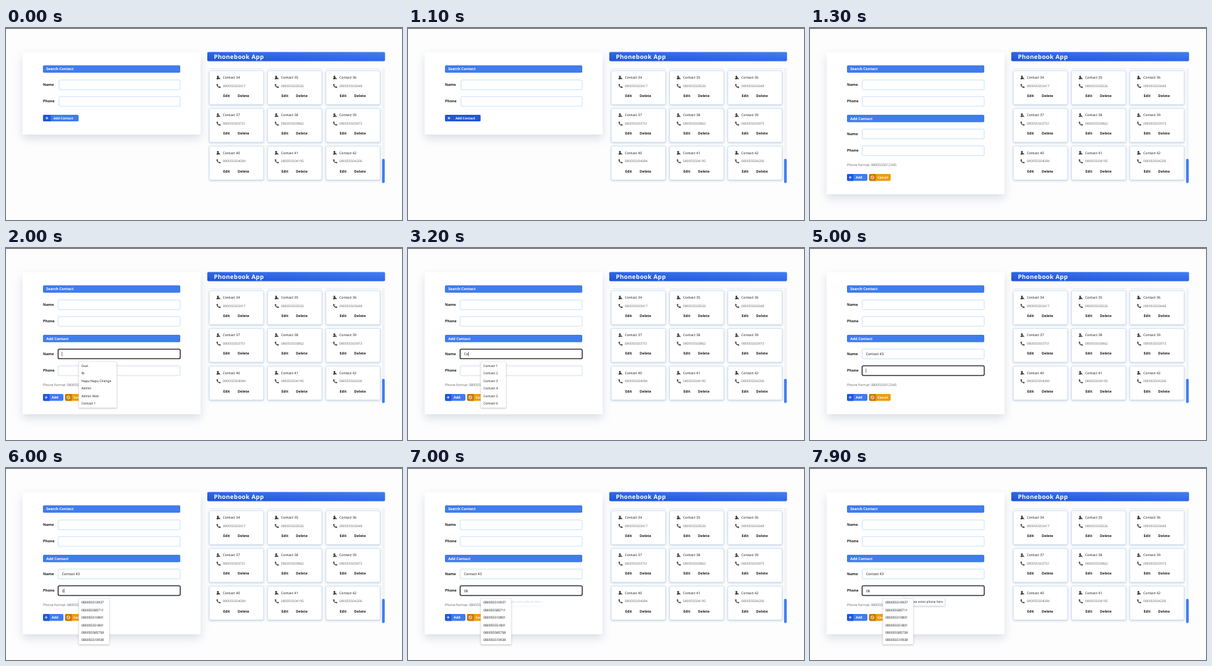
An HTML page that plays this animation: 600x292 px, repeating every 8000 ms.

```html
<!DOCTYPE html>
<html lang="en">
<head>
<meta charset="utf-8">
<title>Phonebook App</title>
<style>
  html, body { margin: 0; width: 100%; height: 100%; overflow: hidden; background: #fdfdfe; }
  svg { display: block; width: 600px; height: 292px; }
  text { font-family: "Noto Sans", "Open Sans", sans-serif; font-size: 5.2px; fill: #1c1c1c;
         white-space: pre; text-rendering: geometricPrecision; }
  .b { font-weight: 700; }
  .w { fill: #fff; }
  .g { fill: #6b6b6b; }
  .panel { fill: #fff; filter: drop-shadow(0 6px 7px rgba(70, 95, 125, .2)); }
  .card { fill: #fff; stroke: #bcdaf7; stroke-width: .7; filter: drop-shadow(0 1.5px 1.5px rgba(70, 95, 130, .28)); }
  .field { fill: #fff; stroke: #b9d8f8; stroke-width: .8; }
  .ring { fill: none; stroke: #1d1d20; stroke-width: 1.3; }
  .pop { fill: #fff; stroke: #dedede; stroke-width: .5; filter: drop-shadow(0 1px 1.2px rgba(0, 0, 0, .22)); }
</style>
</head>
<body>
<svg id="stage" viewBox="0 0 600 292">
  <defs>
    <linearGradient id="bar" x1="0" y1="1" x2="1" y2="0">
      <stop offset="0" stop-color="#1f50d9"/><stop offset="1" stop-color="#427ff1"/>
    </linearGradient>
    <clipPath id="view"><rect x="303" y="61" width="266" height="177"/></clipPath>
    <clipPath id="pill"><rect x="56" y="132" width="54" height="10" rx="1.8"/></clipPath>
  </defs>
</svg>
<script>
const LOOP = 8000;
const BLUE = '#3f7cee', DARK = '#2257dc';
const NAME = 'Contact 43', PHONE = '08';
const nameKeys = [2900, 3200, 3300, 3400, 3500, 3600, 3700, 3800, 4200, 4400];
const phoneKeys = [6000, 6100];
const caretStarts = [1600, 2000, ...nameKeys, 4700, 5000, ...phoneKeys];

const contacts = ['080055503417', '080055503526', '080055503648',
                  '080055503751', '080055503862', '080055503973',
                  '080055504084', '080055504195', '080055504206'];
const people = ['Duvi', 'Ib', 'Napu Napu Orange', 'Admin', 'Admin Wah', 'Contact 1'];
const numbered = [1, 2, 3, 4, 5, 6].map(n => 'Contact ' + n);
const fours = [40, 41, 42, 4].map(n => 'Contact ' + n);
const phones = ['080055510937', '080055585711', '080055510801',
                '080055551801', '080055585758', '080055510938'];

const stage = document.getElementById('stage');
const $ = id => document.getElementById(id);
const rect = (x, y, w, h, rx = 0, extra = '') =>
  `<rect x="${x}" y="${y}" width="${w}" height="${h}" rx="${rx}" ${extra}/>`;
const text = (x, y, s, size, cls = '', extra = '') =>
  `<text x="${x}" y="${y}" class="${cls}" style="font-size:${size}px" ${extra}>${s}</text>`;
const header = (y, s) => rect(56, y, 208, 11.3, 1.8, `fill="${BLUE}"`) + text(61, y + 7.6, s, 5.5, 'b w');
const plus = (x, y) =>
  `<path d="M${x - 2} ${y}h4M${x} ${y - 2}v4" stroke="#fff" stroke-width=".9"/>`;

function row(y, label, id = '') {
  return text(56, y + 9.1, label, 5.55, 'b') +
    rect(79, y, 185, 14.8, 2, `class="field" ${id && `id="${id}"`}`);
}

function card(i) {
  const x = 308 + i % 3 * 88.3, y = 65 + Math.floor(i / 3) * 57.3;
  return `<g transform="translate(${x} ${y})">` +
    rect(0, 0, 82.3, 51.5, 1.8, 'class="card"') +
    '<g fill="#3a3a3a"><circle cx="13" cy="8.9" r="1.4"/>' +
    '<path d="M10.9 13c.2-2.2 1.2-3 2.6-2.9 1.7.1 2.7 1.2 3.4 2.9l-1.7-.3-.7-.9-.4 1.2z"/>' +
    '<path d="M11.3 20.4l1.3-.4.8 1.6-.8.7q.8 1.6 2.3 2.3l.7-.8 1.6.7-.4 1.4q-.2.4-.7.3-4.4-.7-5.2-5.2 0-.4.4-.6z"/></g>' +
    text(20.5, 12, 'Contact ' + (34 + i), 5.15) +
    text(20.5, 24.9, contacts[i], 5.03, 'g') +
    text(21, 40, 'Edit', 5.4, 'b') + text(43, 40, 'Delete', 5.4, 'b') + '</g>';
}

function popup(id, x, y, w, items) {
  return `<g id="${id}">` + rect(x, y, w, items.length * 11.45 + 1.2, .8, 'class="pop"') +
    items.map((s, i) => text(x + 4, y + 7.9 + i * 11.45, s, 4.95)).join('') + '</g>';
}

stage.insertAdjacentHTML('beforeend',
  rect(0, 0, 600, 292, 0, 'fill="#fdfdfe"') +
  rect(0, 0, 600, .9, 0, 'fill="#2b2b2e"') +
  rect(25.3, 37, 269.5, 125, 1, 'class="panel" id="panel"') +
  rect(305, 36.5, 269.3, 14, 1.8, 'fill="url(#bar)"') +
  text(315, 47, 'Phonebook App', 9.1, 'b w', 'letter-spacing=".33"') +
  rect(569.8, 61, 4.2, 175, 2, 'fill="#f1f3f6"') +
  rect(569.8, 199, 4, 36.8, 1.8, `fill="${BLUE}"`) +
  '<g clip-path="url(#view)">' + rect(308, 30, 82.3, 29.6, 1.8, 'class="card"') +
  rect(396.3, 30, 82.3, 29.6, 1.8, 'class="card"') + rect(484.6, 30, 82.3, 29.6, 1.8, 'class="card"') +
  contacts.map((_, i) => card(i)).join('') + '</g>' +
  header(56.8, 'Search Contact') +
  row(79, 'Name', 'findName') + row(104.2, 'Phone', 'findPhone') +

  '<g id="opener"><g clip-path="url(#pill)">' +
  rect(56, 132, 54, 10, 0, `fill="${BLUE}"`) +
  rect(56, 132, 12, 10, 0, `fill="${DARK}" id="sweep"`) + '</g>' +
  plus(62, 137) + text(72, 138.8, 'Add Contact', 4.9, 'b w') + '</g>' +

  '<g id="form">' + header(132, 'Add Contact') +
  row(153.8, 'Name') + row(179.2, 'Phone') +
  rect(79, 153.8, 185, 14.6, 2, 'class="ring" id="nameRing"') +
  rect(79, 179.2, 185, 14.6, 2, 'class="ring" id="phoneRing"') +
  text(84.7, 163.1, '', 5.4, '', 'id="nameText"') +
  text(84.7, 188.6, '', 5.4, '', 'id="phoneText"') +
  rect(84.5, 158, .6, 6.6, 0, 'fill="#222" id="caret"') +
  text(56, 210, 'Phone format: 0800555012345', 5.19, 'g') +
  rect(56, 222, 31, 10.4, 1.8, `fill="${BLUE}"`) +
  `<path d="M65.8 222h-8q-1.8 0-1.8 1.8v6.8q0 1.8 1.8 1.8h8z" fill="${DARK}"/>` +
  plus(60.9, 227.2) + text(69.2, 229, 'Add', 5.1, 'b w') +
  rect(89.5, 222, 32.8, 10.4, 1.8, 'fill="#ee9c10"') +
  '<path d="M99.6 222h-8.3q-1.8 0-1.8 1.8v6.8q0 1.8 1.8 1.8h8.3z" fill="#c87807"/>' +
  '<g fill="none" stroke="#fff" stroke-width=".8"><circle cx="94.6" cy="227.2" r="2.3"/><path d="M93 225.6l3.2 3.2"/></g>' +
  text(102.2, 229, 'Cancel', 4.85, 'b w') +
  '<g id="tip">' + rect(144, 197.3, 60.3, 12.4, .8, 'class="pop"') +
  '<path d="M140 197.5l2-2 2 2" fill="#fff" stroke="#aaa" stroke-width=".5"/>' +
  text(201.5, 205.1, 'Please enter phone here', 4.6, '', 'text-anchor="end"') + '</g>' +
  popup('people', 110.2, 173, 57.6, people) +
  popup('numbered', 110.2, 173, 38.4, numbered) +
  popup('fours', 110.2, 173, 38.4, fours) +
  popup('phones', 110.2, 198.3, 46.4, phones) + '</g>');

const set = (id, attrs) => { for (const k in attrs) $(id).setAttribute(k, attrs[k]); };
const show = (id, on) => { $(id).style.display = on ? '' : 'none'; };
const ramp = (t, a, b) => Math.min(1, Math.max(0, (t - a) / (b - a)));
const typed = (s, keys, t) => s.slice(0, keys.filter(k => k <= t).length);

function render(t) {
  const open = t >= 1300;
  show('opener', !open);
  show('form', open);
  set('panel', { height: open ? 215.8 : 125 });
  for (const id of ['findName', 'findPhone'])
    set(id, open ? { x: 79, width: 185 } : { x: 80.3, width: 183.7 });
  set('sweep', { width: 12 + 42 * ramp(t, 900, 1100) });
  if (!open) return;

  set('nameRing', { opacity: ramp(t, 1500, 1700) * (1 - ramp(t, 4600, 4900)) });
  set('phoneRing', { opacity: ramp(t, 4600, 4900) });
  $('nameText').textContent = typed(NAME, nameKeys, t);
  $('phoneText').textContent = typed(PHONE, phoneKeys, t);

  const inPhone = t >= 4700;
  const field = $(inPhone ? 'phoneText' : 'nameText');
  const since = t - Math.max(...caretStarts.filter(k => k <= t));
  show('caret', since % 1000 < 500);
  set('caret', { x: 84.6 + field.getComputedTextLength(), y: inPhone ? 183.3 : 157.9 });

  show('people', t >= 2000 && t < 2900);
  show('numbered', t >= 2900 && t < 4200);
  show('fours', t >= 4200 && t < 4400);
  show('phones', t >= 6000);
  show('tip', t >= 6900);
  set('tip', { opacity: ramp(t, 6900, 7400) });
}

const start = performance.now();
function tick() {
  render((performance.now() - start) % LOOP);
  requestAnimationFrame(tick);
}
tick();
</script>
</body>
</html>
```
